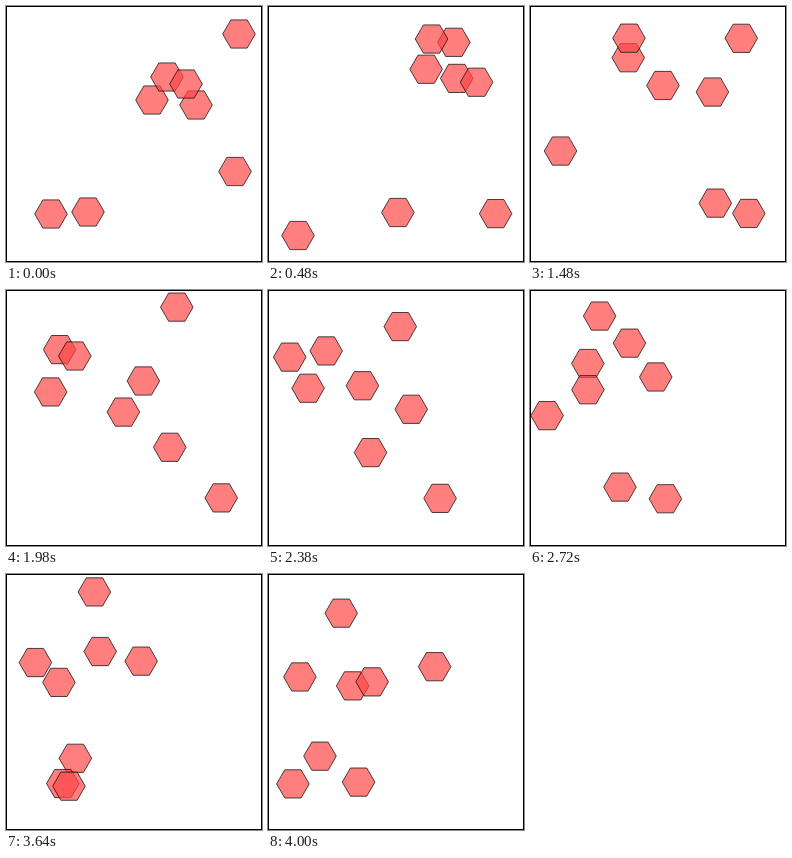
Write an HTML page with a canvas that moves like this. It is 256 px wide and 256 px high and loops after 4.02 s.

```html
<!DOCTYPE html>
<html>
<head>
<meta charset="utf-8">
<title>Bouncing hexagons</title>
<style>
  html, body { margin: 0; height: 100%; overflow: hidden; background: #fff; }
  canvas { display: block; }
</style>
</head>
<body>
<canvas id="stage" width="256" height="256"></canvas>
<script>
const ctx = document.getElementById('stage').getContext('2d');
const SIZE = 256, RADIUS = 16.3, LOOP = 4020, TICK = 20;
const TRAVEL = 372.5; // px covered by every hexagon in one loop
const X_RANGE = [16.4, 239.7], Y_RANGE = [14.5, 241.5];

// Start x, y and heading in degrees
const hexagons = [
  [233, 28, 170],
  [190, 99, 228.3],
  [146, 94, -26.8],
  [229, 165.5, 61.6],
  [82, 206, 0.6],
  [161, 71, 6.3],
  [180, 78, 249.9],
  [45, 208, 108.2]
];

// Key points of the slightly uneven pace: time in ms, share of the distance
const pace = [[0, 0], [560, .15], [920, .231], [1980, .489],
  [2720, .7035], [3280, .8285], [4000, 1]];

function progress(t) {
  const i = pace.findIndex(([time]) => time > t);
  if (i < 0) return 1;
  const [t0, p0] = pace[i - 1], [t1, p1] = pace[i];
  return p0 + (p1 - p0) * (t - t0) / (t1 - t0);
}

// Reflect a free-running coordinate between two walls
function bounce(v, [min, max]) {
  const span = max - min, period = 2 * span;
  const d = ((v - min) % period + period) % period;
  return min + Math.min(d, period - d);
}

function drawHexagon(x, y) {
  ctx.beginPath();
  for (let k = 0; k < 6; k++) {
    const a = k * Math.PI / 3;
    ctx.lineTo(x + RADIUS * Math.cos(a), y + RADIUS * Math.sin(a));
  }
  ctx.closePath();
  ctx.fill();
  ctx.stroke();
}

function draw(now) {
  const t = Math.floor(now % LOOP / TICK) * TICK;
  const distance = TRAVEL * progress(t);
  ctx.fillStyle = '#fff';
  ctx.fillRect(0, 0, SIZE, SIZE);
  ctx.strokeStyle = '#000';
  ctx.strokeRect(.5, .5, SIZE - 1, SIZE - 1);
  ctx.fillStyle = 'rgba(255, 72, 72, .7)';
  ctx.strokeStyle = 'rgba(0, 0, 0, .7)';
  for (const [x, y, heading] of hexagons) {
    const a = heading * Math.PI / 180;
    drawHexagon(bounce(x + distance * Math.cos(a), X_RANGE),
                bounce(y + distance * Math.sin(a), Y_RANGE));
  }
}

const start = performance.now();
function frame() {
  draw(performance.now() - start);
  requestAnimationFrame(frame);
}
frame();
</script>
</body>
</html>
```
